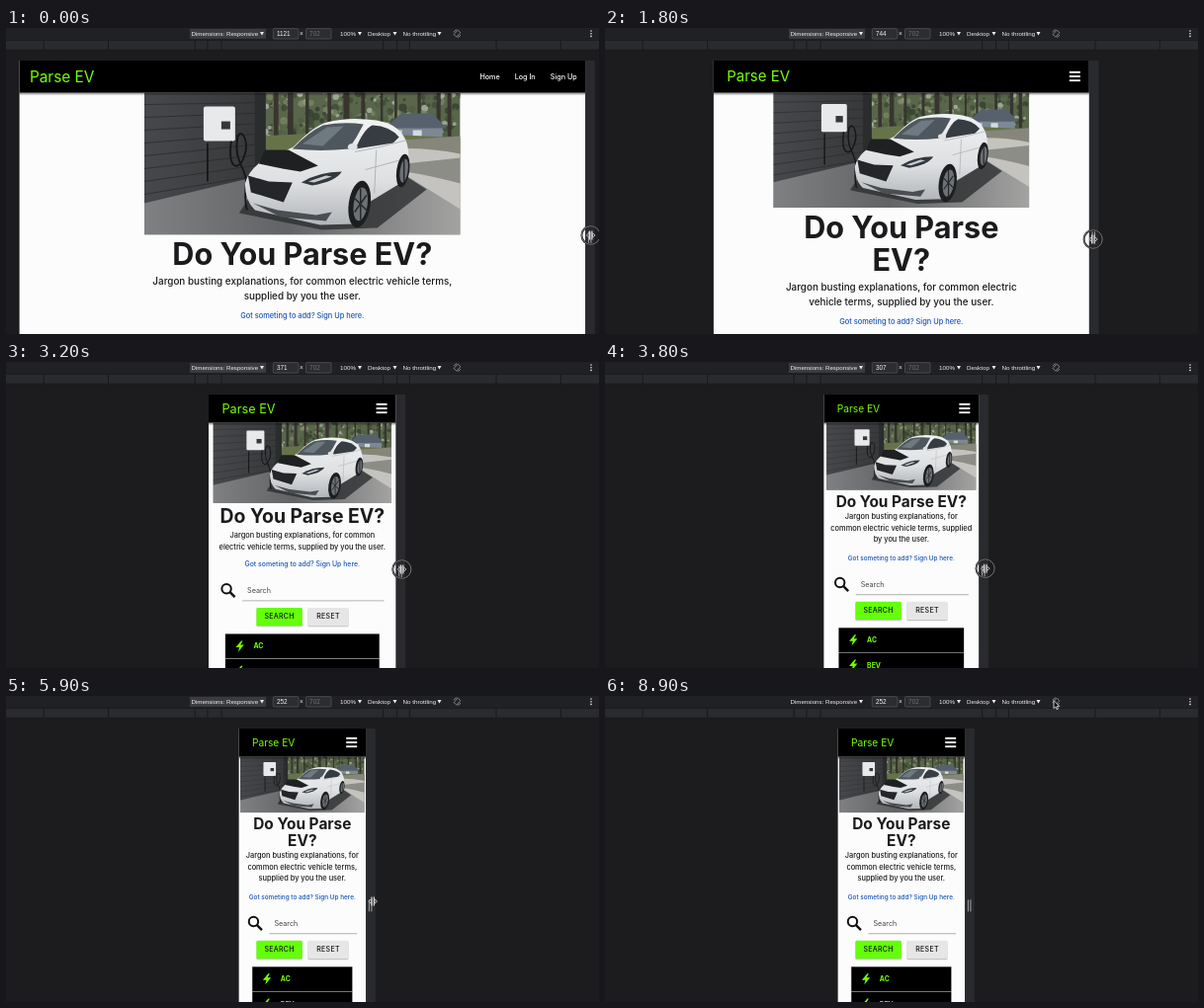
Animation, 600 px wide and 310 px high, one loop 9000 ms. Source, as an HTML page:

```html
<!DOCTYPE html>
<html lang="en">
<head>
<meta charset="utf-8">
<title>Responsive page preview</title>
<style>
  html, body { margin: 0; width: 100%; height: 100%; overflow: hidden; background: #1c1c1e; }
  svg { display: block; width: 600px; height: 310px; }
  .page text { font-family: Inter, sans-serif; }
  .bar text { font-family: "Liberation Sans", Arial, sans-serif; }
</style>
</head>
<body>
<svg viewBox="0 0 600 310" xmlns="http://www.w3.org/2000/svg">
  <defs>
    <linearGradient id="wall" x2="1" y2="0"><stop offset="0" stop-color="#47484b"/><stop offset="1" stop-color="#37383a"/></linearGradient>
    <linearGradient id="floor" x2="1" y2="0"><stop offset="0" stop-color="#7f8082"/><stop offset=".45" stop-color="#626365"/><stop offset="1" stop-color="#a3a3a2"/></linearGradient>
    <linearGradient id="paint" x2="0" y2="1"><stop offset="0" stop-color="#f1f2f3"/><stop offset=".6" stop-color="#dddfe1"/><stop offset="1" stop-color="#b2b5b9"/></linearGradient>
    <linearGradient id="shade" x2="0" y2="1"><stop offset="0" stop-opacity=".45"/><stop offset="1" stop-opacity="0"/></linearGradient>
    <clipPath id="pageClip"><rect id="clipBox" y="33"/></clipPath>
    <clipPath id="photoClip"><rect width="320" height="144"/></clipPath>
    <g id="photo" clip-path="url(#photoClip)">
      <rect width="320" height="144" fill="#59664a"/>
      <g id="trees"></g>
      <path d="M246 36L262 24H290L302 36V48H246Z" fill="#7c8894"/>
      <path d="M244 36L260 21H292L306 36Z" fill="#56616d"/>
      <path d="M252 38h9v7h-9zM272 38h9v7h-9z" fill="#d3dae0"/>
      <path d="M120 44Q190 38 320 46V62H120Z" fill="#66734a"/>
      <path d="M262 48L320 44V66L264 60Z" fill="#86867a"/>
      <path d="M225 60Q270 52 320 62V144H225Z" fill="#c4c3bf"/>
      <path d="M264 72L320 66V92Q290 84 264 80Z" fill="#8d8d88"/>
      <rect width="118" height="112" fill="url(#wall)"/>
      <g id="boards" stroke="#2a2b2d" stroke-width=".8"></g>
      <rect x="112" width="11" height="80" fill="#2b2c2e"/>
      <path d="M0 112L118 84L262 82L320 118V144H0Z" fill="url(#floor)"/>
      <path d="M96 122L180 139L236 137L286 98L264 84L110 100Z" fill="#2c2d2f" opacity=".78"/>
      <rect x="60" y="14" width="32" height="35" rx="2" fill="#e8e9ea"/>
      <rect x="78" y="29" width="9" height="8" fill="#35373a"/>
      <path d="M64 51V90M88 49C84 78 96 80 101 65C108 48 96 32 94 48C91 72 104 76 103 92Q101 108 104 119" fill="none" stroke="#151617" stroke-width="1.8"/>
      <path d="M102 92Q105 80 118 70L151 55Q171 34 185 30Q207 24 235 28Q254 31 262 43Q270 54 267 78L259 92L226 112L214 133L178 134L112 119Q102 110 102 92Z" fill="url(#paint)"/>
      <path d="M150 57Q166 40 181 33Q202 29 222 32Q215 46 207 57Q179 60 150 57Z" fill="#4e575d"/>
      <path d="M214 57Q222 37 231 33Q249 34 258 45L252 51Z" fill="#363c41"/>
      <path d="M160 52L185 35L202 34L181 54Z" fill="#84909a" opacity=".6"/>
      <path d="M213 60Q238 56 266 48M224 78L264 67M235 58L233 102" fill="none" stroke="#a5a9ad" stroke-width=".8"/>
      <path d="M116 72L122 58L146 58L176 74L158 80L140 77Z" fill="#1e2022"/>
      <path d="M105 84L126 90L150 91L141 111L108 101Z" fill="#242629"/>
      <path d="M159 91Q177 80 200 80Q194 90 170 94Z" fill="#33383d"/>
      <path d="M166 90L184 84L190 85L172 91Z" fill="#c5ccd2"/>
      <path d="M110 112L135 119L174 124L190 121L184 130L138 126Z" fill="#4a4d51"/>
      <g fill="#1d1e20"><ellipse cx="218" cy="113" rx="11" ry="24" transform="rotate(8 218 113)"/><ellipse cx="262" cy="79" rx="6.5" ry="17" transform="rotate(8 262 79)"/></g>
      <g fill="#6d7175"><ellipse cx="219" cy="113" rx="7" ry="17" transform="rotate(8 219 113)"/><ellipse cx="263" cy="79" rx="4" ry="12" transform="rotate(8 263 79)"/></g>
      <path d="M219 97V129M212 106L226 120M213 121L225 104M263 68V90" stroke="#26282a" stroke-width="1.5"/>
      <ellipse cx="211" cy="55" rx="5" ry="3.5" fill="#dfe1e3"/>
    </g>
    <path id="bolt" d="M1.5-5.5L-4 1H-.4L-1.6 5.7L4.3-1.5H.7L3-5.5Z" fill="#76ff03"/>
  </defs>
  <rect width="600" height="310" fill="#1c1c1e"/>
  <g id="frame"></g>
  <g class="page" clip-path="url(#pageClip)"><g id="page"></g></g>
  <g class="bar" id="bar"></g>
  <g id="pointer"></g>
</svg>
<script>
const LOOP = 9000, STEP = 100, SCALE = 0.511, CX = 299.8, TOP = 33;
const BRAND = 'Parse EV';
const TITLE = 'Do You Parse EV?';
const INTRO = 'Jargon busting explanations, for common electric vehicle terms, supplied by you the user.';
const GREEN = '#76ff03';

const $ = id => document.getElementById(id);
const pen = document.createElement('canvas').getContext('2d');

// [time, value] pairs
const WIDTH = [[0, 1121], [800, 943], [1050, 902], [1800, 744], [2050, 692], [3050, 410],
  [3200, 371], [4050, 281], [4600, 253], [5500, 252]];
const GAP = [[0, 5.5], [800, 4], [1800, 4], [3200, 6], [4600, 7]];
const DRAG_Y = [[0, 210], [800, 212], [1800, 214], [3200, 210], [4600, 208]];
const RELEASE = 5500, LEAVE = 6000, ARRIVE = 6600, TURN = 6800, TURN_BACK = 8200;

function track(keys, t) {
  const i = keys.findIndex(k => k[0] > t);
  if (i < 0) return keys[keys.length - 1][1];
  const [t0, a] = keys[i - 1], [t1, b] = keys[i];
  return a + (b - a) * (t - t0) / (t1 - t0);
}

function rect(x, y, w, h, fill, more = '') {
  return `<rect x="${x}" y="${y}" width="${w}" height="${h}" fill="${fill}" ${more}/>`;
}

// y is the middle of the capital letters
function text(x, y, size, str, fill, more = '') {
  return `<text x="${x}" y="${y + size * 0.36}" font-size="${size}" fill="${fill}" ${more}>${str}</text>`;
}

function centred(y, size, str, fill, weight) {
  return text(CX, y, size, str, fill, `text-anchor="middle" font-weight="${weight}"`);
}

function line(d, stroke, width = 1) {
  return `<path d="${d}" fill="none" stroke="${stroke}" stroke-width="${width}"/>`;
}

function wrap(str, size, weight, room) {
  pen.font = `${weight} ${size}px Inter, sans-serif`;
  const lines = [''];
  for (const word of str.split(' ')) {
    const last = lines[lines.length - 1];
    const next = last ? last + ' ' + word : word;
    if (last && pen.measureText(next).width > room) lines.push(word);
    else lines[lines.length - 1] = next;
  }
  return lines;
}

function styleFor(w, turned) {
  if (turned) return { logo: 12.7, title: 25.5, lead: 24, titleLine: 28, toIntro: 31, intro: 8.9, introLine: 13.5, toLink: 19.5, link: 7.4 };
  if (w > 600) return { logo: w > 992 ? 15.4 : 15, title: 30.6, lead: 20, titleLine: 33, toIntro: 27, intro: 9.9, introLine: 15, toLink: 20, link: 7.4 };
  if (w > 320) return { logo: 12.7, title: 19.4, lead: 13.5, titleLine: 21, toIntro: 19, intro: 7.4, introLine: 11.5, toLink: 18, link: 6.9 };
  return { logo: 10.2, title: 15.4, lead: 11.5, titleLine: 16.5, toIntro: 15.5, intro: 7.4, introLine: 11.5, toLink: 19, link: 6.4 };
}

function searchForm(y, pw) {
  const half = 0.45 * pw - 2.6, left = CX - half;
  let s = `<circle cx="${left + 6}" cy="${y - 2.2}" r="4.7" fill="none" stroke="#111" stroke-width="2"/>`
    + line(`M${left + 9.5} ${y + 1.3}l5 5`, '#111', 2.4)
    + text(left + 27, y, 7.2, 'Search', '#444')
    + line(`M${left + 22} ${y + 10}H${CX + half}`, '#9e9e9e', 0.8);
  const button = (x, w, fill, label) =>
    rect(x, y + 18, w, 18.4, '#000', 'rx="1.2" opacity=".22"')
    + rect(x, y + 17, w, 18.3, fill, 'rx="1.2"')
    + text(x + w / 2, y + 26, 7, label, '#111', 'text-anchor="middle" font-weight="500" letter-spacing=".3"');
  s += button(253.4, 46.4, '#64ff0a', 'SEARCH') + button(305.5, 41, '#e6e6e6', 'RESET');

  const lw = 0.9 * pw - 15, x = CX - lw / 2;
  ['AC', 'BEV'].forEach((term, i) => {
    const top = y + 43.7 + i * 25.2;
    s += rect(x - 0.5, top - 0.4, lw + 1, 26, '#bbb') + rect(x, top, lw, 24.7, '#000')
      + `<use href="#bolt" x="${x + 14.5}" y="${top + 12.4}"/>`
      + text(x + 28.5, top + 12.4, 6.9, term, GREEN, 'font-weight="700"');
  });
  return s;
}

function drawPage(w, turned) {
  const pw = w * SCALE, left = CX - pw / 2, right = CX + pw / 2;
  const ph = (turned ? 252 : 702) * SCALE;
  const st = styleFor(w, turned);
  const headH = w > 600 ? 32.6 : 28.6, mid = TOP + headH / 2 - 0.3;
  const iw = w > 992 ? 0.558 * pw : w > 600 ? 0.681 * pw : 0.9 * pw + 10;
  let y = TOP + headH;
  let s = rect(left, TOP, pw, ph, '#fcfcfc');

  if (!turned) {
    s += `<use href="#photo" transform="translate(${CX - iw / 2} ${y}) scale(${iw / 320})"/>`;
    y += iw * 0.45;
  }
  y += st.lead;
  wrap(TITLE, st.title, 700, iw - 2).forEach((str, i) => {
    if (i) y += st.titleLine;
    s += centred(y, st.title, str, '#1b1b1d', 700);
  });
  y += st.toIntro;
  wrap(INTRO, st.intro, 500, iw - 6).forEach((str, i) => {
    if (i) y += st.introLine;
    s += centred(y, st.intro, str, '#1a1a1a', 500);
  });
  y += st.toLink;
  s += centred(y, st.link, 'Got someting to add? Sign Up here.', '#1a55b4', 500);
  if (!turned) s += searchForm(y + 27, pw);

  s += rect(left, TOP + headH, pw, 3, 'url(#shade)') + rect(left, TOP, pw, headH, '#000');
  s += text(left + (w > 992 ? 10.5 : 13.5), mid, st.logo, BRAND, GREEN);
  if (w > 992) {
    [['Home', 86.5], ['Log In', 50.5], ['Sign Up', 8.5]].forEach(([label, off]) => {
      s += text(right - off, mid, 7.2, label, '#fff', 'text-anchor="end" font-weight="500"');
    });
  } else {
    for (const dy of [-4.2, 0, 4.2]) s += rect(right - 20, mid + dy - 0.9, 11, 1.8, '#fff');
  }

  for (const [k, v] of [['x', left], ['width', pw], ['height', ph]]) $('clipBox').setAttribute(k, v);
  $('page').innerHTML = s;

  // resize gutters and grips
  const gripY = TOP + ph / 2, end = TOP + ph;
  $('frame').innerHTML = rect(left, TOP, pw + 9.6, ph + 9.6, '#292a2d')
    + line(`M${right + 3.2} ${gripY - 6}v12M${right + 5.7} ${gripY - 6}v12`, '#a4a5a7')
    + line(`M${CX - 6.5} ${end + 3.6}h13M${CX - 6.5} ${end + 6.1}h13`, '#a4a5a7')
    + line(`M${right + 2} ${end + 7.5}l6-6M${right + 5} ${end + 7.5}l3-3`, '#a4a5a7');
}

function drawBar(w, turned, focus) {
  const ink = '#ececee', dim = '#6d6e72';
  const arrow = x => `<path d="M${x} 3.9h4l-2 3.7z" fill="${ink}"/>`;
  const box = (x, value, fill) => rect(x, 0.6, 25.5, 10.4, '#2c2d31', 'stroke="#55565a" stroke-width=".7" rx="1"')
    + text(x + 3.6, 5.7, 6.4, value, fill);
  let s = rect(0, 0, 600, 12.5, '#202124') + rect(0, 12.5, 600, 9.5, '#2a2b2e');
  for (const preset of [320, 375, 425, 768, 1024]) {
    const d = preset * SCALE / 2;
    s += line(`M${CX - d} 13v9M${CX + d} 13v9`, '#1a1a1c');
  }
  s += line('M0 12.5H600M0 22H600', '#19191b', 0.6);
  if (focus) s += rect(186, 0.8, 77, 10, '#3b3c40');
  s += text(187.5, 5.7, 6.15, 'Dimensions: Responsive', ink) + arrow(257)
    + box(270.3, Math.round(w), '#f1f1f2') + text(297, 5.7, 6.5, '×', ink)
    + box(303.5, turned ? 252 : 702, turned ? '#f1f1f2' : dim);
  [['100%', 338, 356], ['Desktop', 366, 391.5], ['No throttling', 401.5, 436.5]].forEach(([label, x, ax]) => {
    s += text(x, 5.7, 6.25, label, ink) + arrow(ax);
  });
  s += `<rect x="454.6" y="2.6" width="3.8" height="6" rx=".7" transform="rotate(45 456.5 5.6)" fill="none" stroke="#9b9ca0" stroke-width=".8"/>`
    + line('M453.2 4.2a3.7 3.7 0 0 1 3-2.4M459.8 7a3.7 3.7 0 0 1-3 2.4', '#9b9ca0', 0.8);
  for (const y of [3, 5.7, 8.4]) s += `<circle cx="592" cy="${y}" r=".8" fill="${ink}"/>`;
  $('bar').innerHTML = s;
}

function drawPointer(t, w) {
  let s;
  if (t <= LEAVE) {
    const x = CX + w * SCALE / 2 + track(GAP, t), y = track(DRAG_Y, t);
    s = line('M-1.2-4.5V4.5M1.2-4.5V4.5', '#d8d8da', 1.2)
      + '<path d="M-1.8-2.2L-4.4 0L-1.8 2.2ZM1.8-2.2L4.4 0L1.8 2.2Z" fill="#222" stroke="#d8d8da" stroke-width=".8"/>';
    if (t < RELEASE) s = '<circle r="9.3" fill="none" stroke="#1d1d1f" stroke-width="2"/>'
      + '<circle r="9.3" fill="none" stroke="#8c8c8e" stroke-width=".8"/>' + s;
    s = `<g transform="translate(${x} ${y})">${s}</g>`;
  } else {
    const p = Math.min(1, (t - LEAVE) / (ARRIVE - LEAVE));
    const e = p * p * (3 - 2 * p);
    const x = 371 + (454 - 371) * e, y = 208 + (4.6 - 208) * e;
    s = `<path transform="translate(${x} ${y})" d="M0 0V8L1.9 6.3L3.1 9L4.5 8.4L3.3 5.8H5.8Z" fill="#111" stroke="#eee" stroke-width=".8"/>`;
  }
  $('pointer').innerHTML = s;
}

function drawScenery() {
  let seed = 7, s = '';
  const rnd = () => (seed = seed * 16807 % 2147483647) / 2147483647;
  const shades = ['#3d4a35', '#7f8c6a', '#4f5d40', '#b9c1b6', '#2f3a2b'];
  for (let i = 0; i < 220; i++) {
    s += `<circle cx="${118 + rnd() * 202}" cy="${rnd() * 46}" r="${1 + rnd() * 3.5}" fill="${shades[i % 5]}" opacity=".7"/>`;
  }
  for (let i = 0; i < 11; i++) s += rect(126 + i * 18 + rnd() * 8, 0, 2 + rnd() * 4, 44, '#38352f');
  $('trees').innerHTML = s;
  $('boards').innerHTML = Array.from({ length: 8 }, (_, i) => `<path d="M0 ${12 + i * 13}L118 ${10 + i * 10.5}"/>`).join('');
}

let shown = -1;
function update(t) {
  if (t === shown) return;
  shown = t;
  const turned = t >= TURN && t < TURN_BACK;
  const w = turned ? 702 : track(WIDTH, t);
  drawPage(w, turned);
  drawBar(w, turned, t < TURN);
  drawPointer(t, w);
}

drawScenery();
const start = performance.now();
function tick() {
  const t = (performance.now() - start) % LOOP;
  update(Math.floor(t / STEP) * STEP);
  requestAnimationFrame(tick);
}
tick();
</script>
</body>
</html>
```
